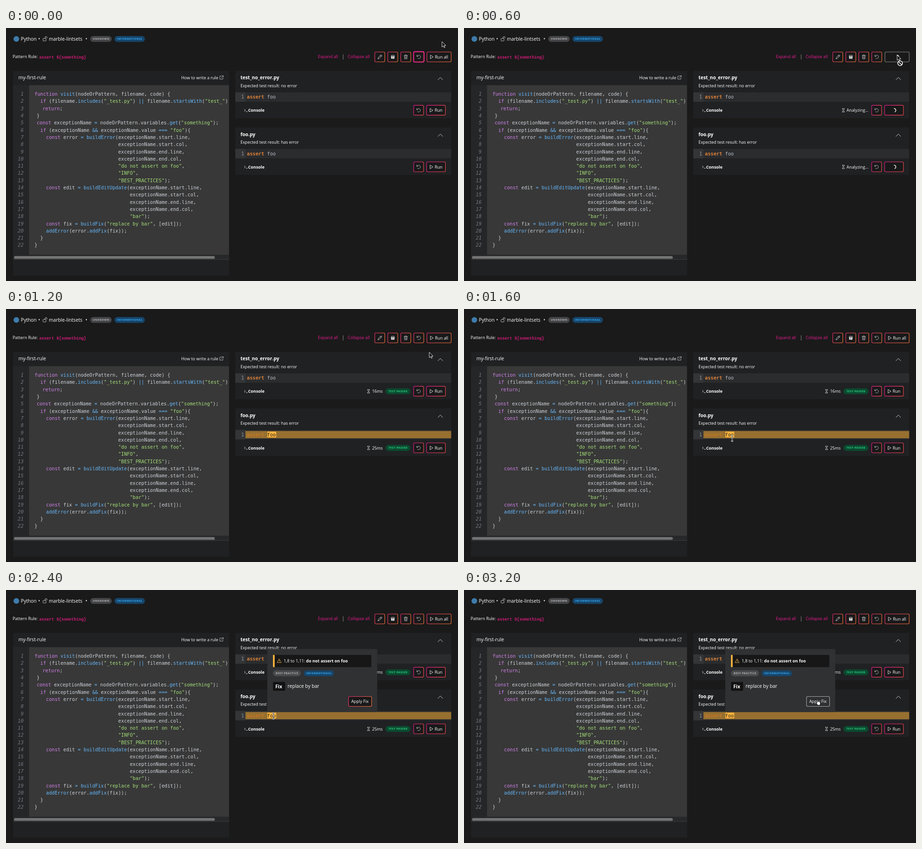
Write an HTML page that moves like this. It is 960x538 px and loops after 3600 ms.

```html
<!DOCTYPE html>
<html lang="en">
<head>
<meta charset="utf-8">
<title>Rule editor</title>
<style>
html, body { margin: 0; width: 100%; height: 100%; overflow: hidden; background: #1a1a1a; }
svg { display: block; }
text { font: 500 8.9px "Open Sans", "Noto Sans", sans-serif; fill: #fff; white-space: pre; }
text.m { font-size: 10.2px; }
text.code { font: 10.2px "DejaVu Sans Mono", monospace; fill: #ccd0d6; }
text.num { font-style: italic; fill: #757a82; text-anchor: end; }
text.rule { font: 700 8.75px "Liberation Mono", monospace; fill: #d01c78; }
text.pill { font-size: 5.7px; font-weight: 700; letter-spacing: .5px; text-anchor: middle; }
text.b, tspan.b { font-weight: 700; }
.kw { fill: #d182ea; }
.fn { fill: #66b8fb; }
.str { fill: #a3de78; }
.line { fill: none; stroke: #fff; stroke-linecap: round; stroke-linejoin: round; }
</style>
</head>
<body>
<svg width="960" height="538" viewBox="0 0 960 538">
  <defs>
    <linearGradient id="warm" x1="0" y1="0" x2="1" y2="0.4">
      <stop offset="0" stop-color="#ea2a70"/><stop offset="1" stop-color="#f6703a"/>
    </linearGradient>
    <linearGradient id="cool" x1="0" y1="0" x2="1" y2="0.4">
      <stop offset="0" stop-color="#e0178a"/><stop offset="1" stop-color="#f0484f"/>
    </linearGradient>
    <clipPath id="codeClip"><rect x="49" y="122" width="424.5" height="360"/></clipPath>
  </defs>
  <g id="base"></g>
  <g id="live"></g>
</svg>
<script>
const STEP = 200, LOOP = 3600, PANEL_GAP = 120.4;
const WARM = "url(#warm)", COOL = "url(#cool)", DARK = "#19191a";

const source = `function visit(nodeOrPattern, filename, code) {
  if (filename.includes("_test.py") || filename.startsWith("test_")
   return;
 }
 const exceptionName = nodeOrPattern.variables.get("something");
  if (exceptionName && exceptionName.value === "foo"){
    const error = buildError(exceptionName.start.line,
                             exceptionName.start.col,
                             exceptionName.end.line,
                             exceptionName.end.col,
                             "do not assert on foo",
                             "INFO",
                             "BEST_PRACTICES");
    const edit = buildEditUpdate(exceptionName.start.line,
                                 exceptionName.start.col,
                                 exceptionName.end.line,
                                 exceptionName.end.col,
                                 "bar");
    const fix = buildFix("replace by bar", [edit]);
    addError(error.addFix(fix));
  }
}`.split("\n");

// Pointer per step: shape, x, y
const pointer = [
  ["arrow", 926, 29], ["hand", 921.5, 60.5], ["hand", 920.5, 60.5], ["blocked", 920, 57.5],
  ["hand", 920.5, 60.5], ["hand", 920.5, 60.5], ["arrow", 899, 92], ["arrow", 700, 213],
  ["beam", 569.5, 275], ["beam", 568, 272.5], ["beam", 568, 269], ["beam", 568, 269],
  ["beam", 568, 268], ["arrow", 594, 246], ["arrow", 690, 236],
  ["hand", 733, 233.5], ["hand", 751, 233.5], ["hand", 751, 233.5]
];

const rect = (x, y, w, h, fill, r = 0, extra = "") =>
  `<rect x="${x}" y="${y}" width="${w}" height="${h}" rx="${r}" fill="${fill}" ${extra}/>`;
const text = (x, y, s, cls = "", fill = "") =>
  `<text x="${x}" y="${y}" class="${cls}"${fill && ` style="fill:${fill}"`}>${s}</text>`;
const path = (d, w = 1, extra = "") => `<path class="line" d="${d}" stroke-width="${w}" ${extra}/>`;
const at = (x, y, s) => `<g transform="translate(${x} ${y})">${s}</g>`;
const pill = (x, y, w, s, bg, fg) =>
  rect(x, y, w, 12.6, bg, 6.3) + text(x + w / 2 + .2, y + 8.4, s, "pill", fg);
const button = (x, y, w, stroke = WARM, fill = DARK) =>
  rect(x, y, w, 21, fill, 2.5, `stroke="${stroke}" stroke-width="1.1"`);

const infoPill = (x, y) => pill(x, y, 64.5, "INFORMATIONAL", "#17456a", "#34abf5");
const passPill = y => pill(806, y, 53, "TEST PASSED", "#0b4a30", "#2fd486");
const play = (x, y) => at(x, y, path("M-2.6-3.6L3.2 0L-2.6 3.6Z", .8));
const reset = (x, y) => at(x, y, path("M-3.4-1.5A3.7 3.7 0 1 1-2.4 2.8M-4-3.9V-1.2H-1.3", .75, `opacity=".8"`));
const chevron = (x, y) => at(x, y, path("M-5 2.6L0-2.5L5 2.6", .9, `opacity=".85"`));
const hourglass = (x, y) =>
  at(x, y, path("M-2.4-3.6H2.4M-2.4 3.6H2.4M-1.7-3.6V-2L1.7 2V3.6M1.7-3.6V-2L-1.7 2V3.6", .65));
const spinner = (x, y, turn) =>
  at(x, y, path("M0-3.8A3.8 3.8 0 0 1 1.4 3.5", 1.3, `transform="rotate(${turn})"`));

const cursors = {
  arrow: `<path d="M0 0V11.3L2.6 8.9L4.4 12.8L6.2 12L4.5 8.2H8Z" fill="#000" stroke="#fff" stroke-width=".9"/>`,
  hand: `<path d="M-.9 6.3V1Q0-.3.9 1V4Q2-.1 2.6 4.2Q3.8 3.5 4.2 4.8Q5.5 4.3 5.7 5.8V8.2Q5.5 9.8 4.6 11.4H.2Q-.6 9.7-2.6 7.2Q-2.8 5.4-.9 6.3Z" fill="#fff" stroke="#000" stroke-width=".8"/>`,
  beam: ["#fff", "#000"].map((c, i) =>
    `<path d="M-2.3-6Q0-6 0-4.6Q0-6 2.3-6M0-4.6V4.6M-2.3 6Q0 6 0 4.6Q0 6 2.3 6M-1.4 2.4H1.4" fill="none" stroke="${c}" stroke-width="${i ? .9 : 2.3}"/>`).join("")
};
cursors.blocked = cursors.arrow +
  `<g fill="#111" stroke="#fff" stroke-width="1.6"><circle cx="6.3" cy="17.5" r="5"/><path d="M2.9 14L9.7 21"/></g>`;

function highlight(line) {
  const rule = /("[^"]*")|\b(function|const|if|return)\b|(\w+(?=\()|={1,3}|&&|\|\|)/g;
  return line.replace(rule, (s, str, kw) => {
    const cls = str ? "str" : kw ? "kw" : "fn";
    return `<tspan class="${cls}">${s.replace(/&/g, "&amp;")}</tspan>`;
  });
}

function topBar() {
  const icons = [
    path("M-3.8 3.8L-3.1 1.2L2.1-4Q3-4.4 3.8-3.6Q4.5-2.7 4-2L-1.2 3.1ZM1.1-2.9L2.9-1.1", .75),
    path("M-3.6-1.3L-2.8-3.3H2.8L3.6-1.3Z", .8) +
      `<path d="M-3.5-.4H3.5V3.8H-3.5ZM-1.5 1V1.8H1.5V1Z" fill="#e4e4e4" fill-rule="evenodd"/>`,
    path("M-3.7-2.9H3.7M-1.4-3V-4.2H1.4V-3M-2.9-2.7L-2.5 4.1H2.5L2.9-2.7M-1-1V2.5M1-1V2.5", .7, `opacity=".85"`)
  ];
  return `<circle cx="22" cy="23.2" r="6" fill="#3e7cac"/>` +
    text(31.5, 27, "Python", "m") + text(68.4, 27, "•", "m") +
    rect(78.6, 22.2, 6.4, 5.4, "none", .8, `stroke="#ddd" stroke-width=".8"`) +
    path("M83 22V20.3Q83 18.4 85 18.4Q87 18.4 87 20.3V21.3", .8) +
    text(91, 27.3, "marble-lintsets", "m") + text(168.7, 27, "•", "m") +
    pill(179, 17, 45.5, "UNKNOWN", "#444547", "#b5b5b7") + infoPill(230.5, 17) +
    text(14, 64.3, "Pattern Rule:") + text(70.4, 64.5, "assert ${something}", "rule") +
    text(662.5, 64.3, "Expand all", "", "#ee1a94") + text(725.7, 64.3, "Collapse all", "", "#ee1a94") +
    rect(715.6, 56, 1, 11, "#858585") +
    icons.map((icon, i) => button(783.2 + i * 27.6, 51, 21.3) + at(793.9 + i * 27.6, 61.5, icon)).join("") +
    button(866, 51, 21.3) + reset(876.8, 61.5);
}

function editor() {
  const lines = source.map((s, i) => {
    const y = (144.1 + i * 15.3).toFixed(1);
    const oddIndent = s.search(/\S/) < 4 && s.search(/\S/) % 2;
    return text(37.3, y, i + 1, "code num") +
      `<g clip-path="url(#codeClip)">${text(oddIndent ? 59 : 60.5, y, highlight(s), "code")}</g>`;
  }).join("");
  return rect(15, 91, 459, 435.5, "#202123") +
    rect(15, 121.6, 34, 360.4, "#252628") + rect(49, 121.6, 424.5, 360.4, "#383838") +
    rect(15, 482, 459, 11, "#27282a") + rect(17, 485, 426.5, 5.8, "#737373", 2.9) +
    rect(15, 491.6, 459, 1, "#3b3c3e") +
    text(26.5, 109, "my-first-rule", "m") + text(372.3, 108.6, "How to write a rule") +
    path("M457 102.3H454V108.8H460.6V106M458.2 101.6H461.5V104.4M461.3 101.8L457 106", .7, `opacity=".85"`) +
    lines;
}

function panel(y, name, expected) {
  return at(0, y, rect(487, 91, 458.5, 101, "#202123") +
    rect(487, 136.8, 458.5, 20, "#2b2c2e") + rect(487, 136.8, 21.5, 20, "#343537") +
    text(498, 109.2, name, "m b") + text(498, 125.6, "Expected test result: " + expected) +
    chevron(922.5, 107.5) + text(499.5, 150.4, "1", "code", "#92979e") +
    path("M506.3 173L508.5 175L506.3 177M510 177.8H513", .8) + text(514.2, 178.2, "Console", "b") +
    button(865.8, 164.4, 21, COOL) + reset(876.4, 175));
}

function testState(y, phase, ms, turn, warn) {
  let s = warn
    ? rect(508.5, 139, 437, 15.5, "#977030") + rect(555.2, 140.4, 18.6, 12.2, "#fdb53e")
    : "";
  s += text(511.5, 150.4, "assert", "code b", warn ? "#c27628" : "#d9813a") +
    text(554.5, 150.4, "foo", "code", warn ? "#29251d" : "#b6bcc5") +
    button(893.3, 164.4, 40, COOL);
  if (phase === "busy") {
    s += hourglass(805.7, 175) + text(812.6, 178.2, "Analyzing...") + spinner(913.5, 175, turn);
  } else {
    s += play(903.6, 175) + text(910.6, 178.2, "Run");
    if (phase === "done") s += hourglass(770, 175) + text(777.4, 178.2, ms + "ms") + passPill(168.7);
  }
  return at(0, y, s);
}

function popup(hover) {
  return rect(555, 125.5, 233.5, 134, "#303132", 2) +
    rect(567, 138, 209, 26, "#171718", 2) + rect(567, 138, 3.6, 26, "#fdb53e", 1) +
    `<path class="line" d="M580.3 146.8L584.6 154.4H576ZM580.3 149.5V151.6M580.3 153V153.1" style="stroke:#d9a040" stroke-width=".9"/>` +
    text(589.8, 154.1, `1,8 to 1,11: <tspan class="b">do not assert on foo</tspan>`) +
    pill(567, 170.8, 59.5, "BEST PRACTICE", "#4a4b4d", "#b9b9bb") + infoPill(632.3, 170.8) +
    rect(567, 195.5, 26, 18.8, "#121213", 2) + text(572, 208.7, "Fix", "m b") +
    text(598, 208.4, "replace by bar", "m") +
    (hover ? button(727.5, 226.5, 49, "#a6a6a6", "#2f3032") : button(727.5, 226.5, 49)) +
    text(733.2, 240.2, "Apply Fix");
}

function live(step) {
  const phase = step < 3 ? "idle" : step < 4 ? "busy" : "done";
  const turn = step * 72 - 216;
  const hover = (step > 0 && step < 3) || step === 4 || step === 5;
  let s = "";
  if (step < 3) {
    s += rect(865.6, 50.2, 22.4, 22.4, "none", 3, `stroke="#e0218a" stroke-width="1.8"`);
  }
  if (phase === "busy") {
    s += button(894, 51, 51.5, "#858585") + spinner(919.7, 61.5, turn);
  } else {
    s += (hover ? button(894, 51, 51.5, "#a0a0a0", "#3e3f40") : button(894, 51, 51.5)) +
      play(904.3, 61.5) + text(911, 64.6, "Run all");
  }
  s += testState(0, phase, 16, turn, false) + testState(PANEL_GAP, phase, 25, turn, phase === "done");
  if (step >= 9) s += popup(step >= 15);
  const [shape, x, y] = pointer[step];
  return s + at(x, y, cursors[shape]);
}

document.getElementById("base").innerHTML = topBar() + editor() +
  panel(0, "test_no_error.py", "no error") + panel(PANEL_GAP, "foo.py", "has error");

const layer = document.getElementById("live");
let shown = -1;
function tick() {
  const step = Math.floor(performance.now() % LOOP / STEP);
  if (step !== shown) layer.innerHTML = live(shown = step);
  requestAnimationFrame(tick);
}
tick();
</script>
</body>
</html>
```
